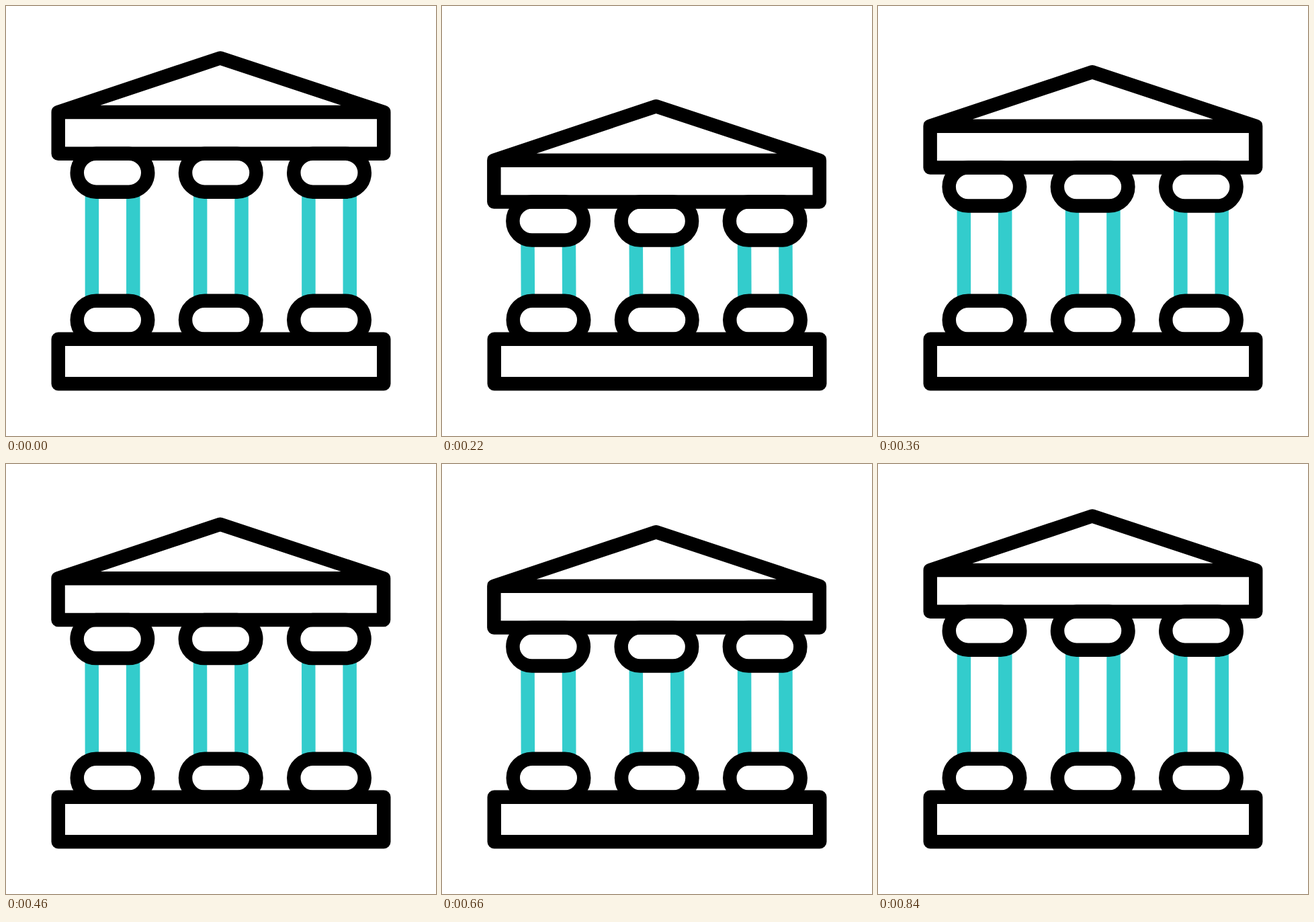
An HTML page for the animation above (1800 ms loop, 640x640 px).

```html
<!DOCTYPE html>
<html lang="en">
<head>
<meta charset="utf-8">
<title>Bouncing temple</title>
<style>
  html, body { margin: 0; width: 100%; height: 100%; overflow: hidden; background: #fff; }
  svg { display: block; width: 100%; height: 100%; }
  g, use { fill: none; stroke-width: 20.5; stroke-linejoin: round; }
  .ink { stroke: #000; }
  .teal { stroke: #33cccc; }
</style>
</head>
<body>
<svg viewBox="0 0 640 640">
  <defs>
    <g id="pills">
      <rect id="pill" x="105.75" width="105.5" height="57" rx="28.5"/>
      <use href="#pill" x="161.25"/>
      <use href="#pill" x="322.5"/>
    </g>
  </defs>
  <g class="teal"><path id="columns"/></g>
  <g class="ink">
    <use href="#pills" y="438.75"/>
    <rect x="77.75" y="495.75" width="484.5" height="66.5"/>
  </g>
  <g class="ink" id="roof">
    <path d="M77.75 157.9 L319 77.4 L562.25 157.9 V219.7 H77.75 Z M77.75 157.9 H562.25"/>
    <use href="#pills" y="219.7"/>
  </g>
</svg>
<script>
  const LOOP = 1800, STEP = 20;
  const roof = document.getElementById('roof');
  const columns = document.getElementById('columns');
  const columnX = [0, 1, 2].flatMap(i => [127.9 + i * 161.25, 189.3 + i * 161.25]);

  // Each dip falls with a sine ease-out and rises with a sine ease-in.
  const dips = [
    { start: 0, low: 197, end: 397, depth: 73 },
    { start: 397, low: 597, end: 840, depth: 26 }
  ];

  function pose(t) {
    const dip = dips.find(d => t < d.end);
    if (!dip) return { dx: 0, dy: 0 };
    const k = t < dip.low
      ? Math.sin(Math.PI / 2 * (t - dip.start) / (dip.low - dip.start))
      : Math.cos(Math.PI / 2 * (t - dip.low) / (dip.end - dip.low));
    return { dx: -0.4 * k, dy: dip.depth * k };
  }

  function draw(ms) {
    const t = Math.floor(((ms + 1) % LOOP) / STEP) * STEP;
    const { dx, dy } = pose(t);
    roof.setAttribute('transform', `translate(${dx} ${dy})`);
    columns.setAttribute('d',
      columnX.map(x => `M${x + dx} ${276.7 + dy} L${x} 438.75`).join(' '));
  }

  const origin = performance.now();
  function tick() {
    draw(performance.now() - origin);
    requestAnimationFrame(tick);
  }
  tick();
</script>
</body>
</html>
```
